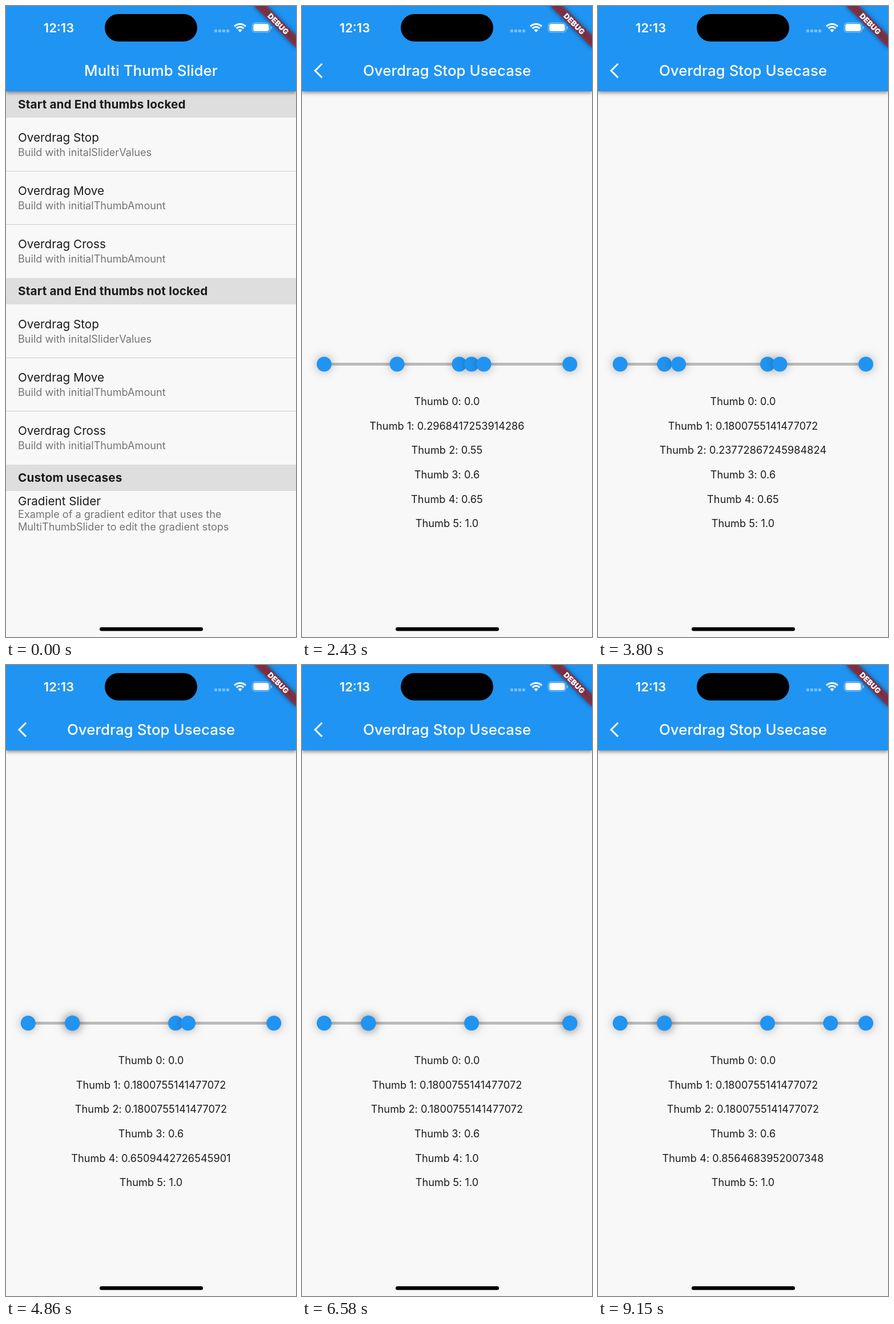
An HTML page with a canvas that plays this animation: 508 by 1102 pixels, repeating every 9.2 s.

```html
<!DOCTYPE html>
<html lang="en">
<head>
<meta charset="utf-8">
<title>Multi Thumb Slider</title>
<style>
  html, body { margin: 0; width: 100%; height: 100%; overflow: hidden; background: #f8f8f8; }
  canvas { display: block; width: 508px; height: 1102px; }
</style>
</head>
<body>
<canvas id="stage"></canvas>
<script>
const W = 508, H = 1102, LOOP = 9200;
const BLUE = '#2094f2', PAPER = '#f8f8f8';
const canvas = document.getElementById('stage');
const ctx = canvas.getContext('2d');
const dpr = window.devicePixelRatio || 1;
canvas.width = W * dpr;
canvas.height = H * dpr;

const clamp = x => Math.min(1, Math.max(0, x));
const mix = (a, b, p) => a * (1 - p) + b * p;
const smooth = p => p * p * (3 - 2 * p);
const hump = p => p < 1 ? Math.sin(Math.PI * p) : 0;

// Progress that advances in even steps, as a screen recording does
function stepped(t, start, end, steps) {
  const n = steps - 1;
  return clamp(Math.floor((t - start) / (end - start) * n + 1e-6) / n);
}

function bezier(x, x1, y1, x2, y2) {
  const at = (s, a, b) => 3 * (1 - s) * (1 - s) * s * a + 3 * (1 - s) * s * s * b + s * s * s;
  let lo = 0, hi = 1;
  for (let i = 0; i < 24; i++) {
    const mid = (lo + hi) / 2;
    if (at(mid, x1, x2) < x) lo = mid; else hi = mid;
  }
  return at(lo, y1, y2);
}

// Drags of one thumb: values run from a to b between start and end
const drags = [
  { thumb: 1, start: 2430, end: 2780, steps: 9, a: 0.2968417253914286, b: 0.1800755141477072, ease: smooth },
  { thumb: 2, start: 3400, end: 3930, steps: 13, a: 0.54905572734541, b: 0.1800755141477072, ease: smooth },
  { thumb: 4, start: 4860, end: 5610, steps: 18, a: 0.6509442726545901, b: 1, ease: smooth },
  { thumb: 4, start: 5960, end: 6580, steps: 15, a: 1, b: 0.7893561427180935, ease: hump },
  { thumb: 4, start: 8170, end: 8530, steps: 9, a: 0.9953271846205417, b: 0.8583557186403841, ease: smooth },
  { thumb: 4, start: 9100, end: 9150, steps: 2, a: 0.8574120569205594, b: 0.8564683952007348, ease: smooth }
];

function thumbValues(t) {
  const values = [0, 0.3, 0.55, 0.6, 0.65, 1];
  for (const d of drags) {
    if (t >= d.start) values[d.thumb] = mix(d.a, d.b, d.ease(stepped(t, d.start, d.end, d.steps)));
  }
  return values;
}

function text(str, x, y, size, weight, color, align = 'left', spacing = 0) {
  ctx.font = `${weight} ${size}px Inter, Roboto, sans-serif`;
  ctx.letterSpacing = spacing + 'px';
  ctx.textAlign = align;
  ctx.fillStyle = color;
  ctx.fillText(str, x, y);
}

function rect(x, y, w, h, color) {
  ctx.fillStyle = color;
  ctx.fillRect(x, y, w, h);
}

function pill(x, y, w, h, r, color) {
  ctx.fillStyle = color;
  ctx.beginPath();
  ctx.roundRect(x, y, w, h, r);
  ctx.fill();
}

function shadow(color, blur, dy = 0) {
  ctx.shadowColor = color;
  ctx.shadowBlur = blur * dpr;
  ctx.shadowOffsetY = dy * dpr;
}

function appBar(title) {
  ctx.save();
  shadow('rgba(0,0,0,.42)', 6, 2.5);
  rect(0, 0, W, 149, BLUE);
  ctx.restore();
  text(title, W / 2, 121.7, 25.85, 500, '#fff', 'center', 0.05);
}

function section(title, y) {
  rect(0, y, W, 46, '#dedede');
  text(title, 21, y + 29.5, 20.68, 700, '#1b1b1b', 'left', 0.15);
}

function tile(title, subtitle, y) {
  text(title, 21, y + 41.6, 20.68, 400, '#1b1b1b');
  text(subtitle, 21, y + 67.4, 18.1, 400, '#757575');
}

const items = [
  ['Overdrag Stop', 'Build with initalSliderValues'],
  ['Overdrag Move', 'Build with initialThumbAmount'],
  ['Overdrag Cross', 'Build with initialThumbAmount']
];

function listPage(press) {
  rect(0, 0, W, H, PAPER);
  rect(0, 195, W, 93, `rgba(0,0,0,${0.04 * press})`);
  ['Start and End thumbs locked', 'Start and End thumbs not locked'].forEach((name, i) => {
    const top = 149 + i * 326;
    section(name, top);
    items.forEach(([title, subtitle], k) => {
      const y = top + 46 + k * 93;
      tile(title, subtitle, y);
      if (k < 2) rect(0, y + 93, W, 1, '#cacace');
    });
  });
  section('Custom usecases', 801);
  text('Gradient Slider', 21, 872, 20.68, 400, '#1b1b1b');
  text('Example of a gradient editor that uses the', 21, 894, 18.1, 400, '#757575');
  text('MultiThumbSlider to edit the gradient stops', 21, 916, 18.1, 400, '#757575');
  appBar('Multi Thumb Slider');
}

function sliderPage(t) {
  rect(0, 0, W, H, PAPER);
  appBar('Overdrag Stop Usecase');
  ctx.strokeStyle = '#fff';
  ctx.lineWidth = 3;
  ctx.beginPath();
  ctx.moveTo(35, 101);
  ctx.lineTo(23, 113);
  ctx.lineTo(35, 125);
  ctx.stroke();

  const values = thumbValues(t);
  rect(39, 623, 430, 5, '#bababa');
  for (const v of values) {
    ctx.save();
    shadow('rgba(0,0,0,.3)', 16);
    ctx.fillStyle = BLUE;
    ctx.beginPath();
    ctx.arc(38.8 + v * 430.4, 625.5, 13, 0, Math.PI * 2);
    ctx.fill();
    ctx.restore();
  }

  // The readout shows up with the first drag
  if (t < drags[0].start) return;
  values.forEach((v, i) => {
    const label = Number.isInteger(v) ? v.toFixed(1) : String(v);
    text(`Thumb ${i}: ${label}`, W / 2, 697 + i * 42.67, 18.1, 400, '#1b1b1b', 'center', 0.08);
  });
}

function statusBar() {
  text('12:13', 92.5, 46, 22, 600, '#fff', 'center');
  pill(173, 14, 162, 48, 24, '#000');
  for (let i = 0; i < 4; i++) pill(365 + i * 7, 41, 5, 5, 1, 'rgba(255,255,255,.4)');

  // Wi-Fi
  const cx = 410, cy = 45.5;
  ctx.strokeStyle = ctx.fillStyle = '#fff';
  ctx.lineWidth = 3;
  for (const r of [14, 9]) {
    ctx.beginPath();
    ctx.arc(cx, cy, r, -Math.PI * 0.75, -Math.PI * 0.25);
    ctx.stroke();
  }
  ctx.beginPath();
  ctx.moveTo(cx, cy + 0.5);
  ctx.arc(cx, cy, 5, -Math.PI * 0.75, -Math.PI * 0.25);
  ctx.fill();

  // Battery
  ctx.strokeStyle = 'rgba(255,255,255,.45)';
  ctx.lineWidth = 1.3;
  ctx.beginPath();
  ctx.roundRect(431.4, 29.4, 31, 16.4, 5);
  ctx.stroke();
  pill(433.3, 31.3, 27.2, 12.6, 3.4, '#fff');
  pill(464, 35, 2, 5.5, [0, 2, 2, 0], 'rgba(255,255,255,.5)');
}

function ribbon() {
  ctx.save();
  ctx.translate(W, 0);
  ctx.rotate(Math.PI / 4);
  ctx.filter = `blur(${4.5 * dpr}px)`;
  rect(-51.7, 36.2, 103.4, 15.5, 'rgba(0,0,0,.5)');
  ctx.filter = 'none';
  rect(-51.7, 36.2, 103.4, 15.5, 'rgba(183,28,28,.627)');
  text('DEBUG', 0, 48.8, 13.2, 900, '#fff', 'center');
  ctx.restore();
}

function pageAt(x, paint) {
  ctx.save();
  ctx.translate(x, 0);
  paint();
  ctx.restore();
}

function edgeShade(x) {
  const g = ctx.createLinearGradient(x - 25, 0, x, 0);
  g.addColorStop(0, 'rgba(0,0,0,0)');
  g.addColorStop(1, 'rgba(0,0,0,.016)');
  rect(x - 25, 0, 25, H, g);
}

function draw(t) {
  ctx.setTransform(dpr, 0, 0, dpr, 0, 0);
  const tick = 1020 + stepped(t, 1020, 1410, 10) * 390;
  const slide = t >= 1410 ? 1 : bezier(clamp((tick - 1121) / 300), 0.35, 0.91, 0.33, 0.97);
  if (slide < 1) {
    const press = t < 1020 ? 0 : clamp((tick - 980) / 130);
    pageAt(-slide * W / 3, () => listPage(press));
  }
  if (slide > 0.001) {
    const x = (1 - slide) * W;
    if (slide < 1) edgeShade(x);
    pageAt(x, () => sliderPage(t));
  }
  statusBar();
  ribbon();
  pill(164, 1085, 181, 6.5, 3.25, '#000');
}

const begin = performance.now();
function frame() {
  draw((performance.now() - begin) % LOOP);
  requestAnimationFrame(frame);
}
frame();
</script>
</body>
</html>
```
